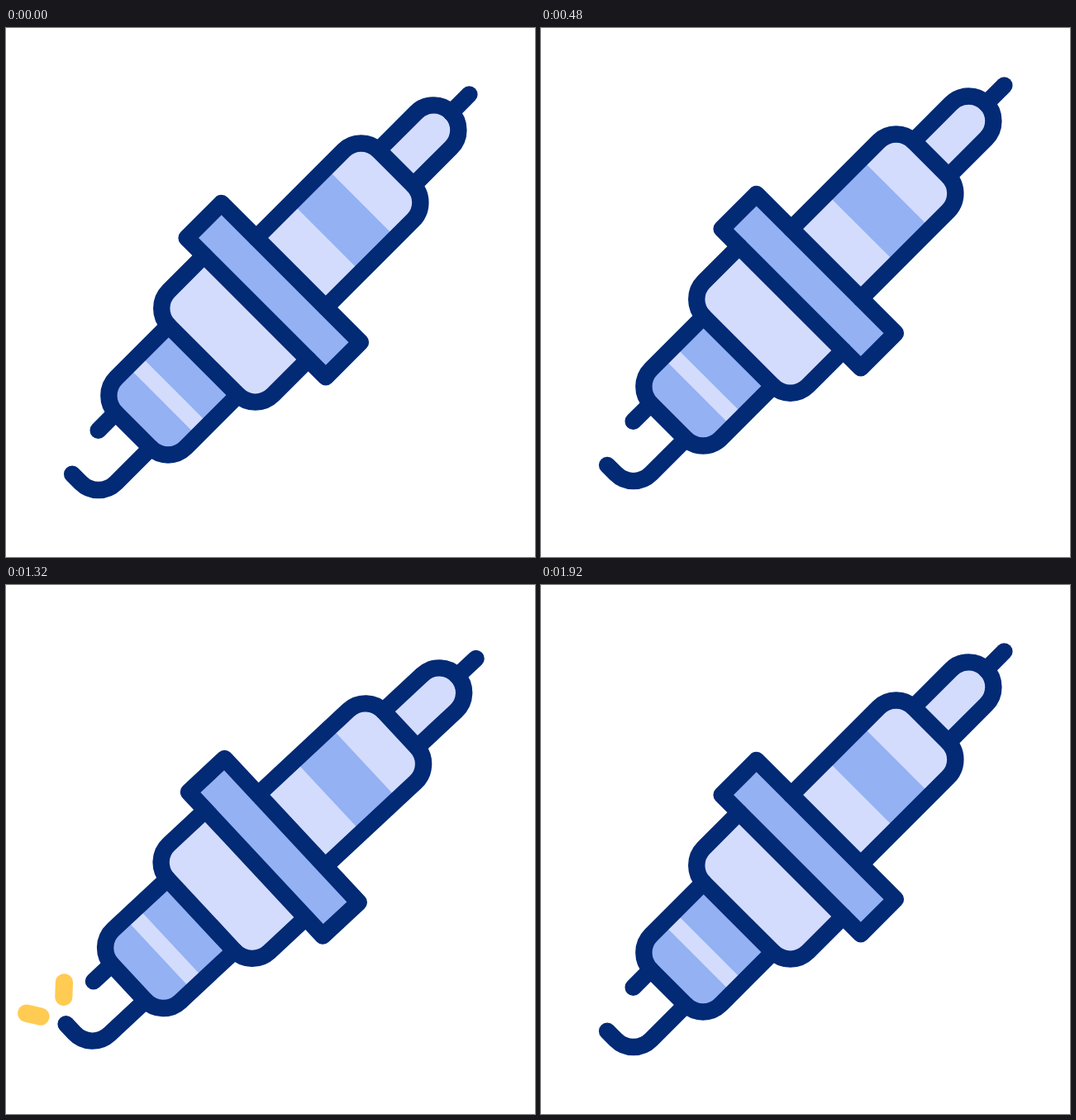
Write an HTML page that moves like this. It is 640x640 px and loops after 2 s.

```html
<!DOCTYPE html>
<html lang="en">
<head>
<meta charset="utf-8">
<title>Spark plug</title>
<style>
  html, body { margin: 0; width: 100%; height: 100%; overflow: hidden; background: #fff; }
  svg { display: block; width: 100%; height: 100%; }
  .ink { fill: none; stroke: #022a75; stroke-width: 20.4; }
  .glow { stroke: #ffcb52; stroke-width: 21.2; }
  .ink, .glow { stroke-linecap: round; stroke-linejoin: round; }
  .light { fill: #d3dcfd; }
  .mid { fill: #93b1f3; }
</style>
</head>
<body>
<svg viewBox="0 0 640 640">
  <defs>
    <path id="terminal" d="M-30-214V-278.6A30 30 0 0 1 30-278.6V-214"/>
    <path id="insulator" d="M-59.5-34.5V-184A30 30 0 0 1-29.5-214H29.5A30 30 0 0 1 59.5-184V-34.5"/>
    <path id="thread" d="M-59.5 115.5V205.3A30 30 0 0 0-29.5 235.3H29.5A30 30 0 0 0 59.5 205.3V115.5"/>
    <path id="shell" d="M-89 25V85.5A30 30 0 0 0-59 115.5H59A30 30 0 0 0 89 85.5V25"/>
    <path id="collar" d="M-119-34.5H119V25H-119Z"/>
  </defs>
  <g id="plug">
    <line class="glow spark"/>
    <line class="glow spark"/>
    <!-- Upright plug, tilted 45 degrees about the stage centre -->
    <g transform="translate(320.4 320.4) rotate(45)">
      <use href="#terminal" class="light"/>
      <use href="#insulator" class="light"/>
      <path class="mid" d="M-59.5-154.2H59.5V-94.8H-59.5Z"/>
      <use href="#thread" class="mid"/>
      <path class="light" d="M-59.5 165.5H59.5V185.5H-59.5Z"/>
      <use href="#shell" class="light"/>
      <use href="#collar" class="mid"/>
      <line class="glow charge"/>
      <line class="glow charge"/>
      <line class="glow charge"/>
      <g class="ink">
        <use href="#terminal"/>
        <use href="#insulator"/>
        <use href="#thread"/>
        <use href="#shell"/>
        <use href="#collar"/>
        <path d="M0-308.6V-339.4"/>
        <path d="M-30 235.3V265.2M30 235.3V295A30 30 0 0 1 0 325H-14.8"/>
      </g>
    </g>
  </g>
</svg>
<script>
  const LOOP = 2000, STEP = 40;
  const plug = document.getElementById('plug');
  const sparkLines = document.querySelectorAll('.spark');
  const chargeLines = document.querySelectorAll('.charge');

  // Key tables: [step, value]
  const HOP = [[2, 0], [6, 20.5], [10, -21.8], [14, 0]];
  const SHAKE = [[0, 0], [2, -4], [4, 2], [8, 0]];
  const SHAKE_STARTS = [29, 40];
  const SPARKS = [
    { from: [76.2, 509.5], to: [76.2, 487] },
    { from: [51.5, 532.2], to: [29.5, 527.8] }
  ];
  const CHARGES = [
    { y: -154.6, start: 14.8 },
    { y: -94.8, start: 20.3 },
    { y: 175.5, start: 25.7 }
  ];
  const EDGE = 59.5, SPEED = 0.255, LAG = 2.4;

  const clamp = p => Math.min(1, Math.max(0, p));
  const ease = p => { p = clamp(p); return p * p * (3 - 2 * p); };
  const mix = (a, b, p) => a + (b - a) * p;

  function valueAt(keys, t) {
    let value = keys[0][1];
    for (let i = 1; i < keys.length; i++) {
      const [t0, a] = keys[i - 1], [t1, b] = keys[i];
      if (t >= t0) value = mix(a, b, ease((t - t0) / (t1 - t0)));
    }
    return value;
  }

  // Shows the part of a segment between tail and head (0 to 1)
  function trim(line, [x0, y0], [x1, y1], tail, head) {
    line.style.display = head > tail ? '' : 'none';
    line.setAttribute('x1', mix(x0, x1, tail));
    line.setAttribute('y1', mix(y0, y1, tail));
    line.setAttribute('x2', mix(x0, x1, head));
    line.setAttribute('y2', mix(y0, y1, head));
  }

  function draw(n) {
    const start = SHAKE_STARTS.find(s => n >= s && n <= s + 8);
    const k = start === undefined ? 0 : n - start;
    plug.setAttribute('transform',
      `translate(0 ${valueAt(HOP, n)}) rotate(${valueAt(SHAKE, k)} 320 320)`);

    SPARKS.forEach(({ from, to }, i) =>
      trim(sparkLines[i], from, to, ease((k - 3) / 5), ease(k / 5)));

    CHARGES.forEach(({ y, start }, i) => {
      const age = n - start;
      trim(chargeLines[i], [EDGE, y], [-EDGE, y],
        clamp((age - LAG) * SPEED), clamp(age * SPEED));
    });
  }

  const origin = performance.now();
  function tick() {
    const t = Math.max(0, performance.now() - origin) % LOOP;
    draw(Math.floor(t / STEP));
    requestAnimationFrame(tick);
  }
  draw(0);
  requestAnimationFrame(tick);
</script>
</body>
</html>
```
